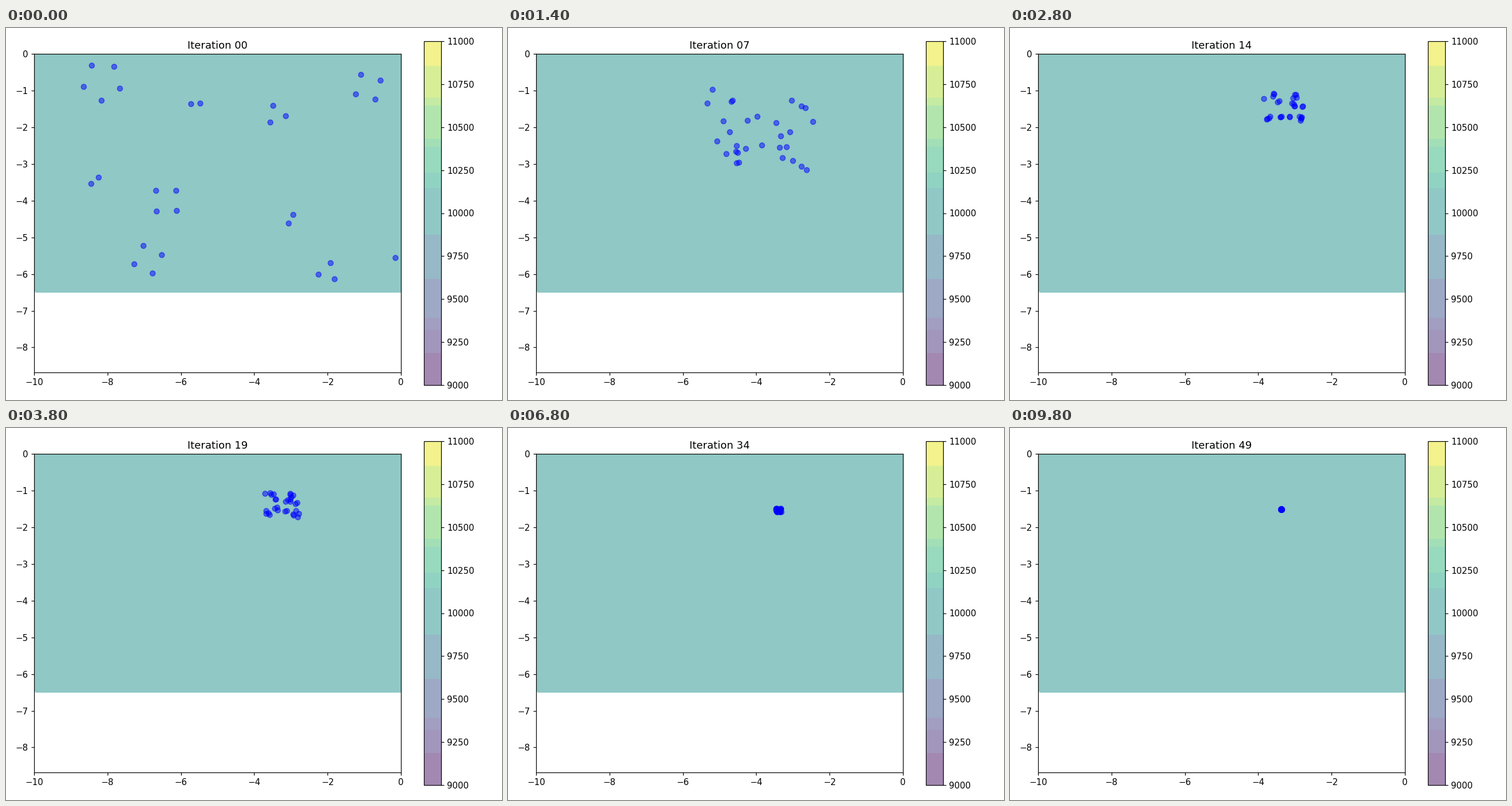
A matplotlib script for the animation above (10000 ms loop, 864 by 648 pixels).

```python
import numpy as np
import matplotlib.pyplot as plt
from matplotlib.animation import FuncAnimation
from matplotlib.colors import ListedColormap

W, H, DPI = 864, 648, 108
STEPS, STEP_MS = 50, 200

# Swarm rule: velocity keeps a share of itself and is pulled to the best point.
INERTIA, PULL = 0.78, 0.047
FIRST_BEST, LAST_BEST, SWITCH = (-3.45, -1.83), (-3.375, -1.515), 8

# Start clusters: x, y, number of particles.
CLUSTERS = [
    (-8.15, -0.75, 5), (-5.6, -1.35, 2), (-3.4, -1.65, 3), (-0.9, -0.9, 4), (-8.35, -3.45, 2),
    (-6.4, -4.0, 4), (-6.9, -5.6, 4), (-3.0, -4.5, 2), (-2.0, -5.95, 3), (-0.15, -5.55, 1),
]
BANDS = [0, 0.093, 0.16, 0.195, 0.309, 0.437, 0.574, 0.618, 0.694, 0.716, 0.813, 0.836, 0.928, 1]


def start_points(rng):
    """Particles scattered evenly round each cluster's middle."""
    points = []
    for x, y, count in CLUSTERS:
        turn = rng.uniform(0, 2 * np.pi)
        radius = 0.13 * (count - 1)
        for k in range(count):
            angle = turn + 2 * np.pi * k / count
            points.append((x + radius * np.cos(angle), y + radius * np.sin(angle)))
    return np.clip(points, (-9.9, -6.35), (-0.1, -0.1))


def simulate():
    rng = np.random.default_rng(4)
    pos = start_points(rng)
    vel = rng.normal(0, 0.1, pos.shape)
    path = [pos]
    for step in range(1, STEPS):
        best = np.array(FIRST_BEST if step <= SWITCH else LAST_BEST)
        vel = INERTIA * vel + PULL * (best - pos)
        pos = pos + vel
        path.append(pos)
    return path


def banded_viridis(size=600):
    """Viridis in flat bands, at half opacity over white."""
    edges = np.array(BANDS)
    middles = (edges[:-1] + edges[1:]) / 2
    shades = 0.5 + 0.5 * plt.get_cmap("viridis")(middles)[:, :3]
    share = (np.arange(size) + 0.5) / size
    return ListedColormap(shades[np.digitize(share, edges) - 1])


PATH = simulate()

fig, ax = plt.subplots(figsize=(W / DPI, H / DPI), dpi=DPI, facecolor="white")
fig.subplots_adjust(left=48.9 / W, right=847.8 / W, top=1 - 22.8 / H, bottom=1 - 622.2 / H)

field = ax.imshow([[10000]], extent=[-10, 0, -6.5, 0], cmap=banded_viridis(),
                  vmin=9000, vmax=11000, zorder=0)
fig.colorbar(field, ax=ax)
ax.fill([-10, -10, -9.95], [-6.5, -6.45, -6.5], color="white", lw=0, zorder=1)
ax.set_xlim(-10, 0)
ax.set_ylim(-8.68, 0)
ax.set_yticks(range(-8, 1))
title = ax.set_title("Iteration 00")
dots = ax.scatter(*PATH[0].T, color="blue", alpha=0.5, zorder=2)


def update(step):
    dots.set_offsets(PATH[step])
    title.set_text(f"Iteration {step:02d}")
    return dots, title


anim = FuncAnimation(fig, update, frames=STEPS, interval=STEP_MS,
                     repeat=True, repeat_delay=0, blit=False)
plt.show()
```
